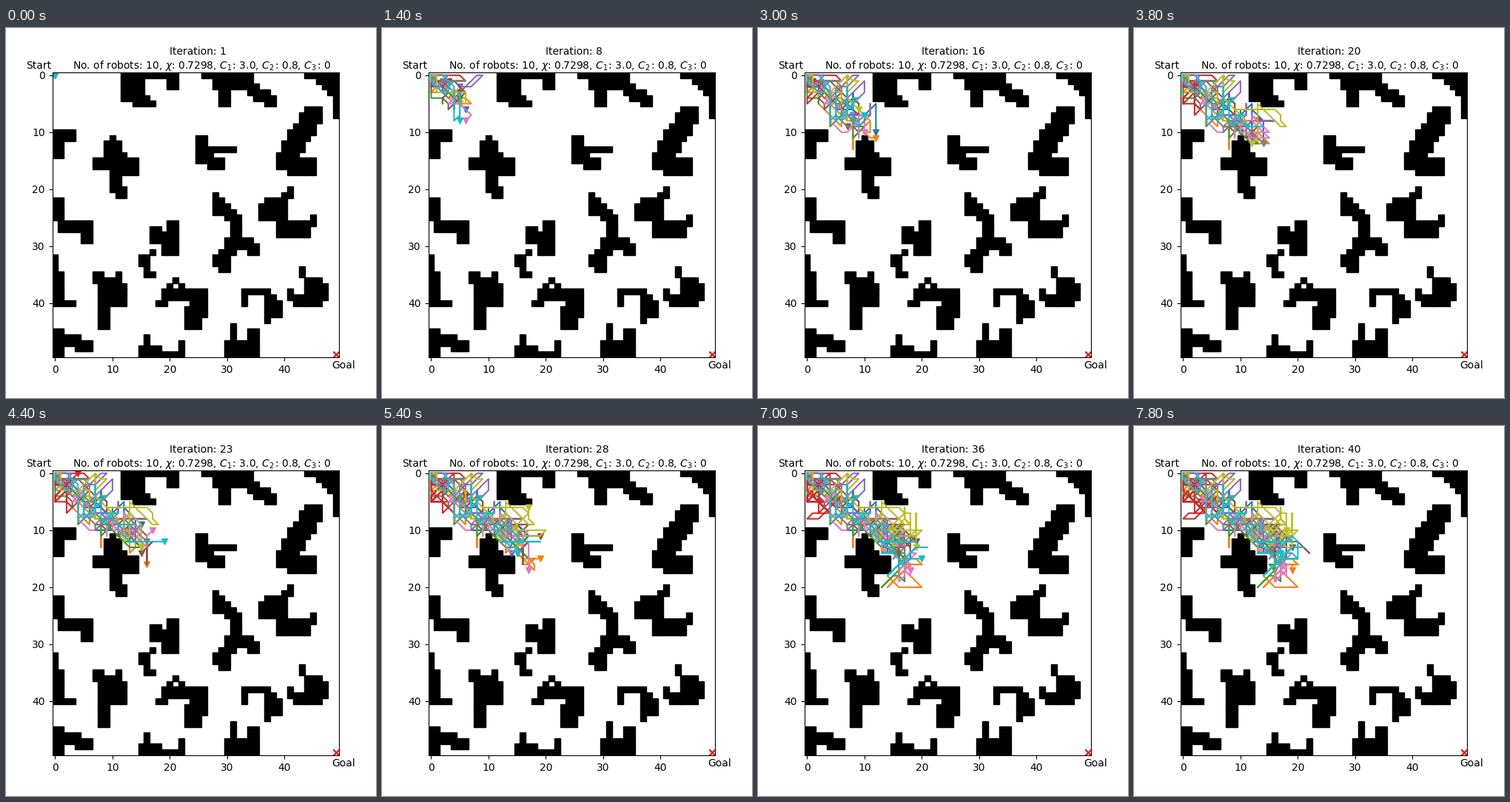
A matplotlib script that plays this animation: 500 by 500 pixels, repeating every 8000 ms.

```python
import matplotlib.pyplot as plt
import numpy as np
from matplotlib.animation import FuncAnimation

SIZE = 50
STEPS = 40
WANDER = 2.4
wall = np.zeros((SIZE, SIZE), bool)  # indexed [x, y]


def stroke(brush, *points):
    """Drag a square brush, held by its top left cell, along a polyline."""
    points = [*points, points[-1]]
    for a, b in zip(points, points[1:]):
        a, b = np.array(a), np.array(b)
        count = abs(b - a).max() + 1
        for x, y in np.rint(np.linspace(a, b, count)).astype(int):
            wall[x:x + brush, y:y + brush] = True


# upper edge
stroke(4, (12, 0), (12, 1))
stroke(1, (16, 0), (21, 0), (21, 2), (20, 2), (20, 1))
stroke(1, (16, 4), (14, 5), (17, 5))
stroke(1, (26, 0), (28, 0))
stroke(3, (28, 0), (32, 0))
stroke(2, (29, 2), (29, 4))
stroke(2, (34, 2), (37, 4))
stroke(1, (44, 0), (49, 0), (49, 7))
stroke(2, (46, 0), (48, 2))

# upper half
stroke(3, (44, 6), (40, 12))
stroke(3, (39, 14), (41, 15), (43, 15))
stroke(2, (25, 11), (25, 14), (28, 15))
stroke(1, (27, 13), (31, 13))
stroke(2, (7, 15), (13, 15))
stroke(3, (9, 12), (10, 15), (12, 15))
stroke(1, (10, 11))
stroke(2, (10, 18), (11, 20))

# left edge
stroke(2, (2, 10), (0, 10), (0, 13))
stroke(2, (0, 22), (0, 24))
stroke(2, (1, 26), (5, 26), (5, 28))
stroke(1, (0, 32), (0, 40), (3, 40))
stroke(2, (0, 35), (0, 38))
stroke(2, (0, 45), (0, 48))
stroke(2, (0, 46), (2, 46), (5, 47))

# middle
stroke(2, (17, 27), (17, 28))
stroke(3, (19, 28), (19, 29))
stroke(2, (20, 26))
stroke(2, (15, 32))
stroke(1, (17, 31), (16, 32), (16, 35), (17, 35))
stroke(1, (28, 21), (28, 24))
stroke(2, (28, 22), (31, 25), (31, 28))
stroke(2, (30, 29), (33, 29), (34, 30))
stroke(2, (30, 30), (28, 32), (29, 33))
stroke(1, (41, 20), (41, 21), (40, 21))
stroke(4, (37, 22))
stroke(1, (36, 23), (36, 25))
stroke(3, (39, 26), (42, 26))
stroke(1, (45, 25), (45, 26))

# lower half
stroke(2, (7, 35), (8, 36), (8, 43))
stroke(3, (9, 36), (9, 38))
stroke(1, (11, 35), (12, 38), (12, 40))
stroke(1, (18, 40), (19, 40), (21, 36), (22, 37))
stroke(2, (19, 38), (25, 38))
stroke(3, (24, 39), (23, 42))
stroke(1, (33, 40), (33, 38), (37, 38), (37, 43))
stroke(2, (37, 39), (38, 41))
stroke(1, (43, 34), (43, 35), (44, 36))
stroke(3, (44, 36), (44, 38))
stroke(1, (47, 37), (47, 39))
stroke(2, (42, 39))
stroke(1, (41, 38), (41, 39))
stroke(1, (16, 46), (16, 48))
stroke(2, (15, 48), (17, 48))
stroke(1, (15, 49), (22, 49), (22, 47))
stroke(1, (31, 44), (31, 47))
stroke(3, (30, 47), (33, 47))
stroke(2, (34, 45))

# Where each robot settles
ENDS = [(15, 13), (19, 17), (16, 17), (3, 5), (16, 13),
        (19, 13), (17, 16), (17, 12), (18, 10), (17, 14)]


def leg(start, goal, rng):
    """Cells of a move made of one diagonal and one straight run."""
    delta = goal - start
    reach = abs(delta)
    diagonal = np.sign(delta)
    straight = diagonal * (reach == reach.max())
    runs = [reach.min(), reach.max() - reach.min()]
    moves = np.repeat([diagonal, straight], runs, axis=0)
    if rng.random() < 0.5:
        moves = moves[::-1]
    return start + np.cumsum(moves, axis=0)


def travel(end, seed):
    """Trail of one robot and its length at every iteration."""
    rng = np.random.default_rng(seed)
    trail, lengths = [np.zeros(2, int)], [1]
    for t in np.arange(1, STEPS) / (STEPS - 1):
        home = np.array(end) * (1 - (1 - t) ** 2)
        spread = WANDER * abs(np.sin(np.pi * t)) ** 0.3
        for _ in range(20):
            spot = np.rint(home + rng.normal(0, spread, 2)).astype(int)
            cells = leg(trail[-1], spot.clip(0, SIZE - 1), rng)
            if not wall[cells[:, 0], cells[:, 1]].any():
                trail.extend(cells)
                break
        lengths.append(len(trail))
    return np.array(trail), lengths


robots = [travel(end, seed) for seed, end in enumerate(ENDS)]

fig = plt.figure(figsize=(5, 5), dpi=100)
ax = fig.add_subplot()
ax.set_xlim(-0.5, SIZE - 0.5)
ax.set_ylim(SIZE - 0.5, -0.5)
ax.plot(*np.nonzero(wall), "ks")
ax.scatter(SIZE - 1, SIZE - 1, c="r", marker="x")

ax.text(-5, -1.13, "Start")
ax.text(48.25, 51.5, "Goal")
gains = ", ".join(rf"$C_{i}\hspace{{0.08}}$: {gain}"
                  for i, gain in enumerate(("3.0", "0.8", "0"), 1))
ax.text(3, -1.13, rf"No. of robots: {len(robots)}, $\chi$: 0.7298, {gains}")
title = ax.text(20, -3.63, "")

lines, heads = [], []
for i in range(len(robots)):
    lines += ax.plot([], [], color=f"C{i}")
    heads += ax.plot([], [], "v", color=f"C{i}")


def draw(step):
    title.set_text(f"Iteration: {step + 1}")
    for (trail, lengths), line, head in zip(robots, lines, heads):
        done = trail[:lengths[step]]
        line.set_data(done[:, 0], done[:, 1])
        head.set_data(done[-1:, 0], done[-1:, 1])
    return [title, *lines, *heads]


anim = FuncAnimation(fig, draw, frames=STEPS, interval=200,
                     init_func=lambda: draw(0), repeat=True)
plt.show()
```
